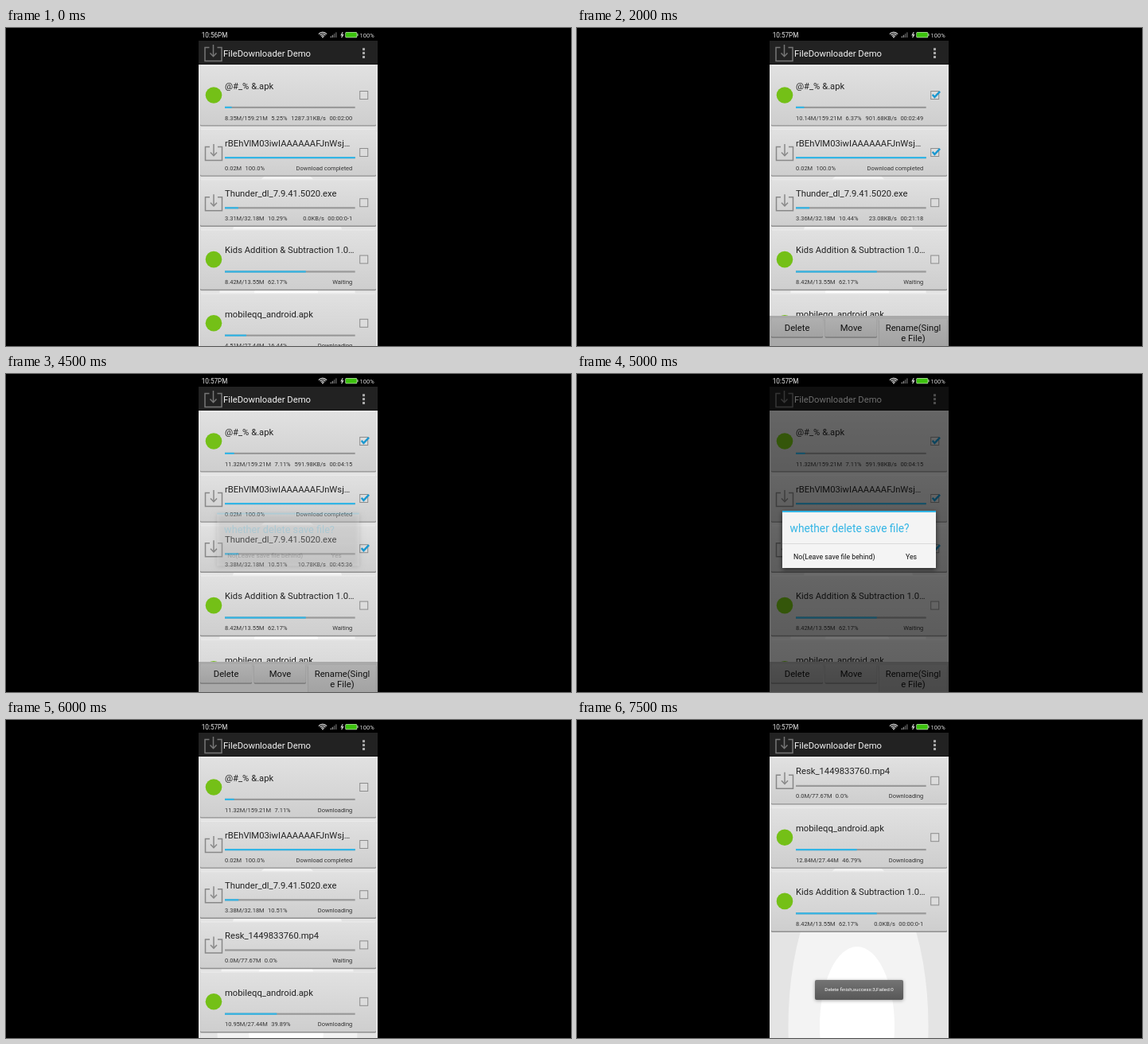
Write an HTML page with a canvas that moves like this. It is 710 by 400 pixels and loops after 8000 ms.

```html
<!DOCTYPE html>
<html lang="en">
<head>
<meta charset="utf-8">
<title>Download manager</title>
<style>
html, body { margin: 0; width: 100%; height: 100%; overflow: hidden; background: #000; }
canvas { display: block; width: 710px; height: 400px; }
</style>
</head>
<body>
<canvas id="stage"></canvas>
<script>
const LOOP = 8000;
const canvas = document.getElementById('stage');
const ctx = canvas.getContext('2d');
const ratio = window.devicePixelRatio || 1;
canvas.width = 710 * ratio;
canvas.height = 400 * ratio;

const BLUE = '#33b5e5', GREEN = '#74c017';
const LEFT = 242, RIGHT = 467, LIST_TOP = 46.8;

// Items of the download list; tall cards belong to apk files.
const base = {
  amp: { name: '@#_% &.apk', tall: true, total: 159.21 },
  pic: { name: 'rBEhVlM03iwIAAAAAAFJnWsj…', size: '0.02M', pct: '100.0%', status: 'Download completed' },
  exe: { name: 'Thunder_dl_7.9.41.5020.exe', total: 32.18 },
  kids: { name: 'Kids Addition & Subtraction 1.0…', tall: true, size: '8.42M/13.55M', pct: '62.17%', status: 'Waiting' },
  clip: { name: 'Resk_1449833760.mp4', size: '0.0M/77.67M', pct: '0.0%', status: 'Waiting' },
  qq: { name: 'mobileqq_android.apk', tall: true, total: 27.44, status: 'Downloading' }
};

function item(key, done, pct, status, time) {
  const row = { ...base[key] };
  if (done) {
    row.size = done + 'M/' + row.total + 'M';
    row.pct = pct + '%';
  }
  if (status) row.status = status;
  row.time = time;
  return row;
}

function mainList(amp, exe) {
  return [item('amp', ...amp), item('pic'), item('exe', ...exe), item('kids'), item('qq', '4.51', '16.44')];
}

function restList(done, pct) {
  return [item('clip', null, null, 'Downloading'), item('qq', done, pct),
    item('kids', null, null, '0.0KB/s', '00:00:0-1')];
}

function pausedList(clip, done, pct) {
  return [item('amp', '11.32', '7.11', 'Downloading'), item('pic'),
    item('exe', '3.38', '10.51', 'Downloading'), item('clip', null, null, clip), item('qq', done, pct)];
}

const exeA = ['3.36', '10.44', '23.08KB/s', '00:21:18'];
const listA = mainList(['8.35', '5.25', '1287.31KB/s', '00:02:00'], ['3.31', '10.29', '0.0KB/s', '00:00:0-1']);
const listB = mainList(['9.41', '5.91', '1085.12KB/s', '00:02:21'], exeA);
const listC = mainList(['10.14', '6.37', '901.68KB/s', '00:02:49'], exeA);
const listD = mainList(['10.74', '6.75', '742.36KB/s', '00:03:25'], ['3.37', '10.48', '15.42KB/s', '00:31:53']);
const listE = mainList(['11.32', '7.11', '591.98KB/s', '00:04:15'], ['3.38', '10.51', '10.78KB/s', '00:45:36']);

// checked: number of ticked rows; dialog: opening progress
const scenes = [
  { at: 0, rows: listA, checked: 0 },
  { at: 500, rows: listB, checked: 1 },
  { at: 1500, rows: listB, checked: 2 },
  { at: 2000, rows: listC, checked: 2 },
  { at: 3000, rows: listD, checked: 2 },
  { at: 3500, rows: listD, checked: 3 },
  { at: 4500, rows: listE, checked: 3, dialog: 0.22 },
  { at: 5000, rows: listE, checked: 3, dialog: 1, dim: 0.55 },
  { at: 5500, rows: listE, checked: 3, dim: 0.2 },
  { at: 6000, rows: pausedList('Waiting', '10.95', '39.89'), checked: 0 },
  { at: 6500, rows: pausedList('Downloading', '11.92', '43.44'), checked: 0 },
  { at: 7000, rows: restList('12.37', '45.08'), checked: 0 },
  { at: 7500, rows: restList('12.84', '46.79'), checked: 0, toast: true }
];

function rect(x, y, w, h, fill) {
  ctx.fillStyle = fill;
  ctx.fillRect(x, y, w, h);
}

function rounded(x, y, w, h, r, fill) {
  ctx.beginPath();
  ctx.roundRect(x, y, w, h, r);
  ctx.fillStyle = fill;
  ctx.fill();
}

function line(points, color, width) {
  ctx.beginPath();
  points.forEach(([x, y]) => ctx.lineTo(x, y));
  ctx.strokeStyle = color;
  ctx.lineWidth = width;
  ctx.stroke();
}

function oval(x, y, rx, ry, fill) {
  ctx.beginPath();
  ctx.ellipse(x, y, rx, ry, 0, 0, Math.PI * 2);
  ctx.fillStyle = fill;
  ctx.fill();
}

// Draws text and returns its width.
function text(str, x, y, size, color, align = 'left') {
  ctx.font = size + 'px Roboto, "Noto Sans", sans-serif';
  ctx.textAlign = align;
  ctx.fillStyle = color;
  ctx.fillText(str, x, y);
  return ctx.measureText(str).width;
}

function fade(top, bottom, y, h) {
  const g = ctx.createLinearGradient(0, y, 0, y + h);
  g.addColorStop(0, top);
  g.addColorStop(1, bottom);
  return g;
}

function trayIcon(x, y, color) {
  line([[x - 5, y - 7], [x - 10.5, y - 7], [x - 10.5, y + 10], [x + 10.5, y + 10],
    [x + 10.5, y - 7], [x + 5, y - 7]], color, 1.5);
  line([[x, y - 10.5], [x, y + 4]], color, 1.5);
  line([[x - 4, y], [x, y + 4.2], [x + 4, y]], color, 1.5);
}

function checkbox(x, y, on) {
  rect(x - 5, y - 5, 10, 10, '#dcdcdc');
  ctx.strokeStyle = '#8c8c8c';
  ctx.lineWidth = 1;
  ctx.strokeRect(x - 5, y - 5, 10, 10);
  if (on) line([[x - 3, y - 0.8], [x - 0.3, y + 2.4], [x + 6.4, y - 4.6]], '#1b98d0', 2.4);
}

function panel(x, y, w, h, top, bottom, edge) {
  rounded(x, y + 0.8, w, h, 1.5, edge);
  rounded(x, y, w, h - 0.6, 1.5, fade(top, bottom, y, h));
}

function card(row, y, on) {
  const h = row.tall ? 76 : 59;
  const mid = y + (row.tall ? 37.7 : 29.5);
  const bar = y + (row.tall ? 52 : 35);
  const base = y + (row.tall ? 68.8 : 51.5);
  panel(244, y, 221, h, '#e1e1e1', '#cecece', '#8f8f8f');
  rect(245, y + 0.2, 219, 0.8, '#ededed');

  if (row.tall) oval(261, mid, 10.3, 10.3, GREEN);
  else trayIcon(261, mid, '#888');

  text(row.name, 275, y + (row.tall ? 30 : 21.5), 11.25, '#222');
  rect(275, bar, 163.7, 2.2, '#999');
  rect(275, bar, 163.7 * parseFloat(row.pct) / 100, 2.2, BLUE);

  const small = 7.5, ink = '#333', gap = 4.4;
  const w = text(row.size, 275, base, small, ink);
  text(row.pct, 275 + w + gap, base, small, ink);
  let end = 435.3;
  if (row.time) end -= text(row.time, end, base, small, ink, 'right') + gap;
  text(row.status, end, base, small, ink, 'right');
  checkbox(449.7, mid, on);
}

function backdrop() {
  rect(LEFT, 46, 225, 354, '#e4e4e4');
  oval(353.5, 385, 88, 210, '#f3f3f3');
  oval(352, 385, 47, 100, '#fff');
}

function header() {
  rect(LEFT, 16, 225, 30, '#222');
  rect(LEFT, 45, 225, 1, '#141414');
  trayIcon(260.5, 31.5, '#777');
  text('FileDownloader Demo', 273, 36, 11.25, '#f3f3f3');
  for (let i = 0; i < 3; i++) rect(448, 25.2 + i * 4.9, 3, 3, '#aaa');
}

function statusBar(clock) {
  rect(LEFT, 0, 225, 16, '#000');
  text(clock, 245.7, 12, 8.2, '#e6e6e6');
  for (const r of [2.4, 4.6, 6.8]) {
    ctx.beginPath();
    ctx.arc(398, 12.2, r, -Math.PI * 0.77, -Math.PI * 0.23);
    ctx.strokeStyle = '#ddd';
    ctx.lineWidth = 1.2;
    ctx.stroke();
  }
  oval(398, 11.6, 0.9, 0.9, '#ddd');
  for (let i = 0; i < 4; i++) rect(407.5 + i * 2.2, 10.5 - i * 1.7, 1.5, 1.5 + i * 1.7, i < 2 ? '#888' : '#555');
  line([[423.2, 5.3], [421.3, 8.8], [423.6, 8.6], [421.6, 12]], '#ddd', 1.1);
  rounded(426.3, 5, 15, 7.2, 1.5, '#b9d8ae');
  rounded(427, 5.7, 13.6, 5.8, 1, '#3cc20e');
  rect(441.3, 7.2, 1.2, 2.8, '#b9d8ae');
  text('100%', 444.6, 11.6, 7.5, '#ddd');
}

function button(x, y, w, h) {
  panel(x, y, w, h, '#b0b0b0', '#a2a2a2', '#737373');
}

function actionBar() {
  rect(LEFT, 362, 225, 38, '#a9a9a9');
  button(244, 365, 65, 24);
  button(311.8, 365, 65, 24);
  button(379.6, 366, 86, 36);
  const label = (str, x, y) => text(str, x, y, 11.25, '#111', 'center');
  label('Delete', 276.6, 381.2);
  label('Move', 344.5, 381.2);
  label('Rename(Singl', 422.5, 381.2);
  label('e File)', 422.5, 394.4);
}

function dialog(open) {
  ctx.save();
  if (open < 1) {
    ctx.globalAlpha = open;
    ctx.translate(354.5, 208);
    ctx.scale(0.925, 0.925);
    ctx.translate(-354.5, -208);
  }
  ctx.shadowColor = 'rgba(0,0,0,0.6)';
  ctx.shadowBlur = 6 * ratio;
  ctx.shadowOffsetY = 1.5 * ratio;
  rect(258, 172, 193, 72, '#f4f4f4');
  ctx.shadowColor = 'transparent';
  rect(258, 172, 193, 2, BLUE);
  rect(258, 213, 193, 0.8, '#d4d4d4');
  text('whether delete save file?', 267.6, 199, 13.75, BLUE);
  text('No(Leave save file behind)', 323.3, 232.6, 8.75, '#111', 'center');
  text('Yes', 420, 232.6, 8.75, '#111', 'center');
  ctx.restore();
}

function toast() {
  ctx.save();
  ctx.shadowColor = 'rgba(0,0,0,0.35)';
  ctx.shadowBlur = 4 * ratio;
  ctx.shadowOffsetY = ratio;
  rounded(299, 327, 111, 25, 2, fade('#747474', '#575757', 327, 25));
  ctx.restore();
  text('Delete finish,success:3,Failed:0', 354.5, 341.2, 6.25, '#fff', 'center');
}

function draw(t) {
  const s = scenes.findLast(scene => t >= scene.at);
  ctx.setTransform(ratio, 0, 0, ratio, 0, 0);
  rect(0, 0, 710, 400, '#000');
  ctx.save();
  ctx.beginPath();
  ctx.rect(LEFT, 0, RIGHT - LEFT, 400);
  ctx.clip();
  backdrop();
  let y = LIST_TOP;
  s.rows.forEach((row, i) => {
    card(row, y, i < s.checked);
    y += row.tall ? 80.2 : 63.2;
  });
  header();
  if (s.checked) actionBar();
  if (s.dim) rect(LEFT, 16, 225, 384, `rgba(0,0,0,${s.dim})`);
  if (s.dialog) dialog(s.dialog);
  if (s.toast) toast();
  statusBar(t < 500 ? '10:56PM' : '10:57PM');
  ctx.restore();
}

const start = performance.now();
function tick() {
  draw((performance.now() - start) % LOOP);
  requestAnimationFrame(tick);
}
tick();
</script>
</body>
</html>
```
